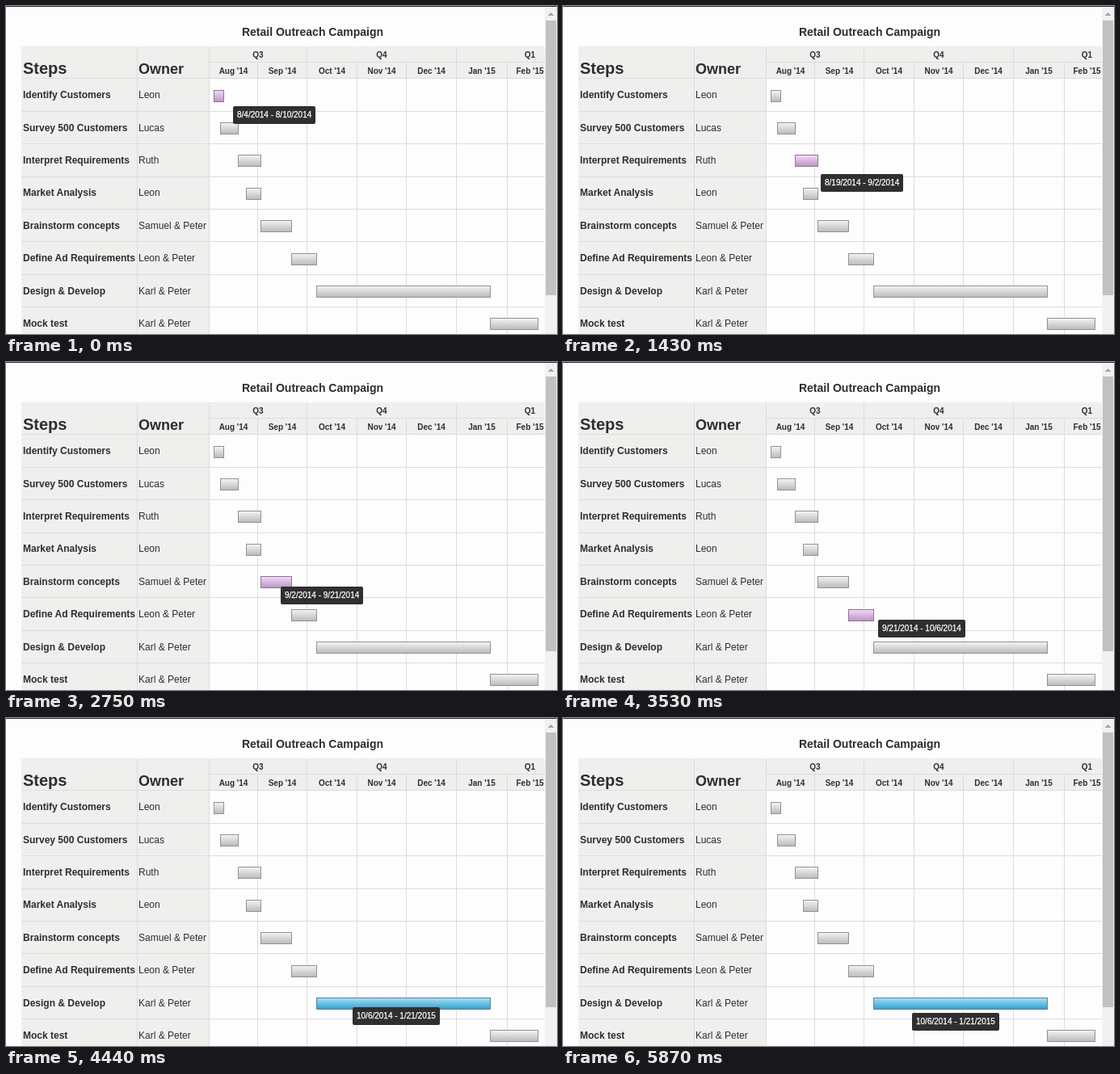
These frames come from a looping animation (682 by 406 pixels, 6130 ms). An HTML page:

```html
<!DOCTYPE html>
<html lang="en">
<head>
<meta charset="utf-8">
<title>Gantt chart</title>
<style>
  html, body { margin: 0; height: 100%; overflow: hidden; background: #fdfdfd; }
  svg { display: block; font-family: "Liberation Sans", Arial, sans-serif; fill: #2d2d2d; }
  .bold { font-weight: bold; }
  .mid { text-anchor: middle; }
</style>
</head>
<body>
<svg id="stage" width="682" height="406" viewBox="0 0 682 406"></svg>
<script>
const LOOP = 6130, STEP = 130, GLIDE = 650, LINGER = 150;
const PITCH = 40.4, DAY = 2.015;
const stage = document.getElementById('stage');

const tasks = [
  { step: 'Identify Customers', owner: 'Leon', dates: '8/4/2014 - 8/10/2014' },
  { step: 'Survey 500 Customers', owner: 'Lucas', dates: '8/8/2014 - 8/19/2014' },
  { step: 'Interpret Requirements', owner: 'Ruth', dates: '8/19/2014 - 9/2/2014' },
  { step: 'Market Analysis', owner: 'Leon', dates: '8/24/2014 - 9/2/2014' },
  { step: 'Brainstorm concepts', owner: 'Samuel & Peter', dates: '9/2/2014 - 9/21/2014' },
  { step: 'Define Ad Requirements', owner: 'Leon & Peter', dates: '9/21/2014 - 10/6/2014' },
  { step: 'Design & Develop', owner: 'Karl & Peter', dates: '10/6/2014 - 1/21/2015', hue: 'blue' },
  { step: 'Mock test', owner: 'Karl & Peter', dates: '1/21/2015 - 2/19/2015' }
];

// when the pointer is on each bar, and the tooltip's path meanwhile
const hovers = [
  { enter: 0, leave: 100, from: [281, 124], to: [281, 124] },
  { enter: 390, leave: 780, from: [293, 163], to: [298, 169] },
  { enter: 1040, leave: 1560, from: [319, 202], to: [319, 210] },
  { enter: 1840, leave: 2360, from: [317, 244], to: [317, 248] },
  { enter: 2750, leave: 3400, from: [340, 278], to: [346, 281] },
  { enter: 3530, leave: 3660, from: [390, 319], to: [390, 319] },
  { enter: 4050, leave: LOOP, from: [425, 348], to: [432, 365] }
];

function add(tag, attrs, parent = stage) {
  const el = document.createElementNS('http://www.w3.org/2000/svg', tag);
  for (const k in attrs) el.setAttribute(k, attrs[k]);
  return parent.appendChild(el);
}
const box = (x, y, width, height, fill) => add('rect', { x, y, width, height, fill });
function label(text, x, y, size, cls = '') {
  add('text', { x, y, 'font-size': size, class: cls }).textContent = text;
}
function gradient(id, top, bottom) {
  const g = add('linearGradient', { id, x1: 0, y1: 0, x2: 0, y2: 1 });
  add('stop', { offset: 0, 'stop-color': top }, g);
  add('stop', { offset: 1, 'stop-color': bottom }, g);
}

// time axis
const dateX = (y, m, d) => 311.4 + DAY * (Date.UTC(y, m, d) - Date.UTC(2014, 8, 1)) / 864e5;
const monthX = m => Math.round(Math.max(251, dateX(2014, m, 1)));
function barX(date) {
  const [m, d, y] = date.split('/');
  return Math.floor(dateX(y, m - 1, d) + 2.15);
}

gradient('grey', '#f4f4f4', '#bababa');
gradient('purple', '#f3dcf6', '#bd93c6');
gradient('blue', '#a8dff5', '#309fcd');
const edges = { grey: '#929292', purple: '#8c7492', blue: '#5b8497' };

// table background and grid
const line = '#dcdcdc', head = '#efefee';
box(19, 50, 648, 40, head);
box(19, 90, 232, 316, head);
tasks.forEach((_, i) => box(19, Math.floor(89.9 + PITCH * i), 648, 1, line));
box(251, 69, 416, 1, line);
box(162, 50, 1, 356, line);

// months (August is 7) and quarters
const names = ['Aug', 'Sep', 'Oct', 'Nov', 'Dec', 'Jan', 'Feb'];
names.forEach((name, i) => {
  const m = i + 7, x = monthX(m), top = i && m % 3 ? 70 : 50;
  box(x, top, 1, 406 - top, line);
  label(`${name} '${m < 12 ? 14 : 15}`, (x + monthX(m + 1)) / 2 + .5, 84, 10, 'bold mid');
});
['Q3', 'Q4', 'Q1'].forEach((name, i) => {
  const m = 6 + 3 * i;
  label(name, (monthX(m) + monthX(m + 3)) / 2 + .5, 64, 10, 'bold mid');
});

label('Retail Outreach Campaign', 379.5, 37, 14, 'bold mid');
label('Steps', 21, 84, 20, 'bold');
label('Owner', 164, 84, 18, 'bold');

const bars = tasks.map(({ step, owner, dates }, i) => {
  const base = Math.floor(114.65 + PITCH * i);
  label(step, 21, base, 12, 'bold');
  label(owner, 164, base, 12);
  const [left, right] = dates.split(' - ').map(barX);
  return add('rect', { x: left + .5, y: Math.floor(104 + PITCH * i) + .5, width: right - left, height: 14 });
});

// window edge and scrollbar
box(0, 0, 682, 1, '#2c2c2c');
box(667, 1, 15, 405, '#f1f1f1');
box(668, 18, 13, 340, '#c1c1c1');
add('path', { d: 'M670.5 12 L674.5 8 L678.5 12 Z', fill: '#a3a3a3' });

const tip = add('g', {});
const tipBox = add('rect', { height: 22, rx: 2, fill: '#2f2f2f' }, tip);
const tipText = add('text', { x: 5, y: 14, 'font-size': 10, fill: '#fff', stroke: '#fff', 'stroke-width': .25 }, tip);

function draw(t) {
  const now = hovers.findLastIndex(h => h.enter <= t);
  const { enter, leave, from, to } = hovers[now];
  bars.forEach((bar, i) => {
    const hue = i === now && t < leave ? tasks[i].hue || 'purple' : 'grey';
    bar.setAttribute('fill', `url(#${hue})`);
    bar.setAttribute('stroke', edges[hue]);
  });

  const held = Math.floor((t - enter) / STEP) * STEP;
  const p = Math.min(1, held / Math.min(GLIDE, leave - enter));
  const [x, y] = from.map((a, k) => Math.round(a + (to[k] - a) * p));
  tip.setAttribute('transform', `translate(${x} ${y})`);
  tip.setAttribute('visibility', t < leave + LINGER ? 'visible' : 'hidden');
  tipText.textContent = tasks[now].dates;
  tipBox.setAttribute('width', Math.round(tipText.getComputedTextLength()) + 10);
}

const start = performance.now();
function tick() {
  draw((performance.now() - start) % LOOP);
  requestAnimationFrame(tick);
}
tick();
</script>
</body>
</html>
```
